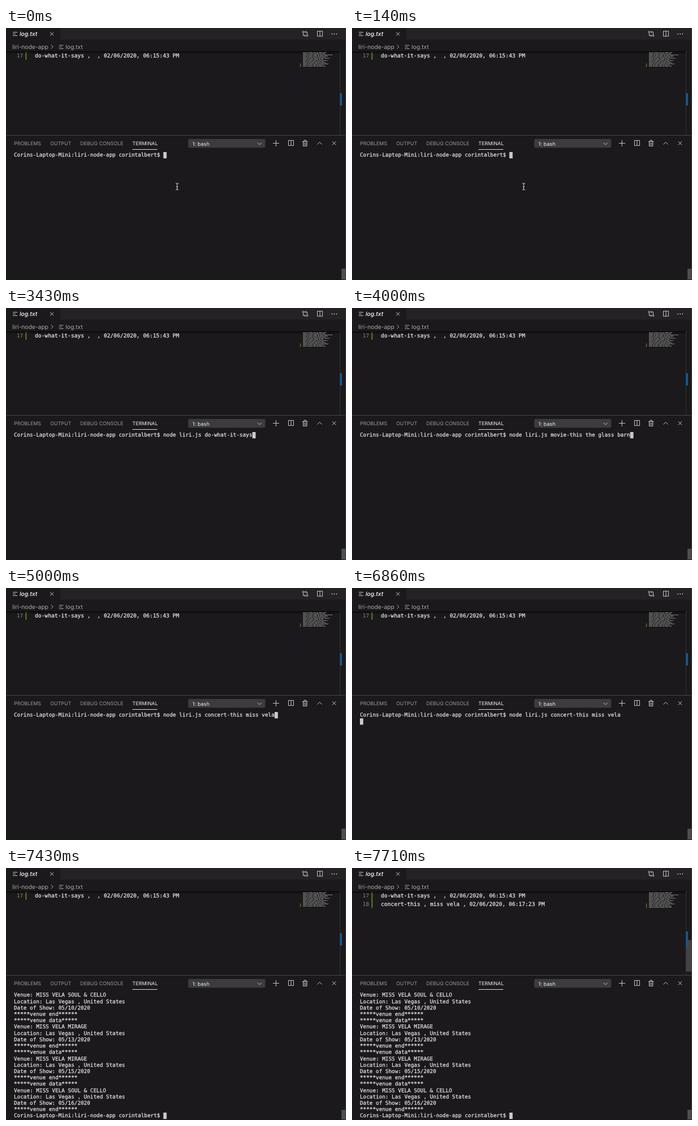
An HTML page that plays this animation: 600x445 px, repeating every 8 s.

```html
<!DOCTYPE html>
<html lang="en">
<head>
<meta charset="utf-8">
<title>Terminal session</title>
<style>
  html, body { margin: 0; width: 100%; height: 100%; overflow: hidden; background: #1b191b; }
  svg { display: block; }
  text { white-space: pre; text-rendering: geometricPrecision; }
  .ui { font-family: Inter, sans-serif; font-size: 10.3px; fill: #a8a7a8; }
  .tabs { font-size: 8.9px; fill: #9a999a; }
  .mono { font-family: "DejaVu Sans Mono", monospace; fill: #e0e0e0; stroke: #e0e0e0; stroke-width: .28; }
  .edit { font-size: 9.62px; }
  .term { font-size: 9.32px; }
  .icon { fill: none; stroke: #c8c8c8; stroke-width: 1; }
  .dim { stroke: #a8a7a8; }
  .num { fill: #858585; stroke: none; }
</style>
</head>
<body>
<svg width="600" height="445" viewBox="0 0 600 445">
  <defs>
    <linearGradient id="shade" x2="0" y2="1">
      <stop stop-opacity=".6"/><stop offset="1" stop-opacity="0"/>
    </linearGradient>
  </defs>
  <rect width="600" height="445" fill="#1b191b"/>
  <rect x="96" width="504" height="20.5" fill="#242224"/>

  <!-- tab and breadcrumb -->
  <g class="ui">
    <text x="24" y="14" fill="#fff" style="fill:#fff" font-style="italic" font-weight="500">log.txt</text>
    <text x="11" y="37">liri-node-app</text>
    <text x="105" y="37">log.txt</text>
  </g>
  <path class="icon" d="M12 7.5h8M12 10.5h5M12 13.5h8M78 7.5l6 6m0-6l-6 6"/>
  <path class="icon dim" d="M79.5 29.5l3.5 3.5-3.5 3.5M93.5 30.5h8M93.5 33.5h5M93.5 36.5h8"/>

  <!-- editor actions -->
  <g class="icon">
    <circle cx="524.5" cy="7" r="1.4"/><circle cx="531.5" cy="13.5" r="1.4"/>
    <path d="M524.5 8.5v5h4m-1.5-1.7l1.7 1.7-1.7 1.7M531.5 12V7h-4m1.5-1.7L527.3 7l1.7 1.7"/>
    <path d="M549.5 5.5h9v9h-9zM554 5.5v9"/>
  </g>
  <g fill="#c8c8c8">
    <circle cx="575.2" cy="10.5" r=".9"/><circle cx="579.2" cy="10.5" r=".9"/><circle cx="583.2" cy="10.5" r=".9"/>
  </g>

  <!-- editor -->
  <g class="mono edit">
    <text class="num" x="18.7" y="52">17</text>
    <text x="51" y="52">do-what-it-says ,  , 02/06/2020, 06:15:43 PM</text>
    <g id="entry">
      <text class="num" x="18.7" y="66.5">18</text>
      <text x="51" y="66.5">concert-this , miss vela , 02/06/2020, 06:17:23 PM</text>
    </g>
  </g>
  <rect id="gutter" x="34.3" y="42" width="2" fill="#5b7f1c"/>
  <rect y="41" width="589" height="5" fill="url(#shade)"/>
  <g id="minimap" stroke="#8a8a8a" stroke-width="1"></g>
  <rect id="mapMark" x="519" y="62.5" width="1.3" fill="#5b7f1c"/>
  <path d="M589.5 41v148" stroke="#303032"/>
  <rect id="scroll" x="589" y="127" width="11" height="56" fill="#434244"/>
  <rect id="overview" x="589" width="4" fill="#1b5486"/>

  <!-- panel -->
  <path d="M0 189.5h600" stroke="#444345"/>
  <g class="ui tabs">
    <text x="14" y="207.3">PROBLEMS</text>
    <text x="78" y="207.3">OUTPUT</text>
    <text x="131" y="207.3">DEBUG CONSOLE</text>
    <text x="223" y="207.3" style="fill:#f0f0f0">TERMINAL</text>
  </g>
  <path d="M223 214.5h44" stroke="#dcdcdc"/>
  <rect x="321.5" y="196" width="136" height="15.5" rx="2.5" fill="#3c3b3d"/>
  <text id="shell" class="ui" x="329" y="207.5" style="font-size:9.2px;fill:#f0f0f0"></text>
  <g class="icon">
    <path d="M444 202.5l3.5 3.5 3.5-3.5M476.5 198v11M471 203.5h11"/>
    <path d="M498.5 198.5h9v9h-9zM503 198.5v9"/>
    <path d="M523 200.5h9.5M526 200v-1.7h3.5v1.7M524.5 201v7.5h6.5V201M526.7 202.5v4.5M528.8 202.5v4.5"/>
    <path d="M549.5 205.5l4-4 4 4M575.8 200.2l6.4 6.4m0-6.4l-6.4 6.4"/>
  </g>
  <g id="term" class="mono term"></g>
  <rect id="caret" y="219" width="5.8" height="11.2" fill="#cbcbcb"/>
  <rect id="termScroll" x="592" width="8" fill="#4e4d4f"/>
  <path d="M599.5 0v445" stroke="#3d3c3e"/>
  <path id="mouse" d="M299.5 274q2.5 0 2.5 2v8q0 2-2.5 2m5-12q-2.5 0-2.5 2m0 8q0 2 2.5 2M300.5 280.5h3" fill="none" stroke="#ddd"/>
</svg>
<script>
const $ = id => document.getElementById(id);
const NS = 'http://www.w3.org/2000/svg';
const add = (parent, tag, attrs) => {
  const el = document.createElementNS(NS, tag);
  set(el, attrs);
  return parent.appendChild(el);
};
function set(el, attrs) {
  for (const k in attrs) el.setAttribute(k, attrs[k]);
}
const show = (el, on) => set(el, { visibility: on ? 'visible' : 'hidden' });

const LOOP = 8000, CELL = 5.61, ROW = 11.21, LEFT = 14;
const prompt = 'Corins-Laptop-Mini:liri-node-app corintalbert$ ';
const run = 'node liri.js ';
const search = prompt + run + 'concert-this miss vela';
const place = 'Location: Las Vegas , United States';
const start = '*****venue data*****', end = '*****venue end******';
const venue = (name, day) =>
  ['Venue: MISS VELA ' + name, place, `Date of Show: 05/${day}/2020`, end];
const loaded = [search, 'this is loaded'];
const results = [
  ...venue('SOUL & CELLO', 10), start,
  ...venue('MIRAGE', 13), start,
  ...venue('MIRAGE', 15), start,
  ...venue('SOUL & CELLO', 16), prompt
];

// Terminal contents by start time; the caret follows the last line.
const screens = [
  [0, [prompt]],
  [1430, [prompt + 'clear']],
  [3430, [prompt + run + 'do-what-it-says']],
  [3860, [prompt + run + 'movie-this the glass barn']],
  [4430, [prompt + run + 'spotify-this-song lamp dust']],
  [5000, [search]],
  [6860, [search, '']],
  [7000, [...loaded, '']],
  [7290, [...loaded, start, 'Venue: MISS VELA MIRAGE', place, '']],
  [7430, results]
];

const rows = results.map((_, i) => add($('term'), 'text', { x: LEFT, y: 227.4 + i * ROW }));
const mapWidths = [42, 40, 52, 44, 41, 48, 36, 44, 38, 42, 45, 37, 40, 41];
const mapLines = mapWidths.map((w, i) => add($('minimap'), 'path', {
  d: `M524 ${43.5 + i * 2}h${w}`,
  'stroke-dasharray': `${5 + i * 3 % 4} 1 3 .8 ${7 - i % 3} 1.2`
}));

function draw(t) {
  const lines = screens.filter(s => s[0] <= t).pop()[1];
  rows.forEach((el, i) => {
    const line = lines[i] || '';
    if (el.textContent !== line) el.textContent = line;
  });
  const last = lines.length - 1;
  set($('caret'), { x: LEFT + lines[last].length * CELL, y: 219 + last * ROW });
  $('shell').textContent = t >= 7000 && t < 7430 ? '1: node' : '1: bash';

  show($('mouse'), t < 1430);
  set($('mouse'), { transform: `translate(${t < 140 ? 0 : 1})` });

  const logged = t >= 7570, settled = t >= 7710, full = t >= 7430;
  show($('entry'), logged);
  show($('scroll'), logged);
  show(mapLines[mapLines.length - 1], logged);
  set($('gutter'), { height: settled ? 28.5 : 14 });
  set($('mapMark'), { height: settled ? 8 : 6.5 });
  set($('overview'), settled ? { y: 112, height: 27 } : { y: 115, height: 22 });
  set($('termScroll'), full ? { y: 427, height: 17 } : { y: 425, height: 19 });
}

function tick() {
  draw(performance.now() % LOOP);
  requestAnimationFrame(tick);
}
tick();
</script>
</body>
</html>
```
